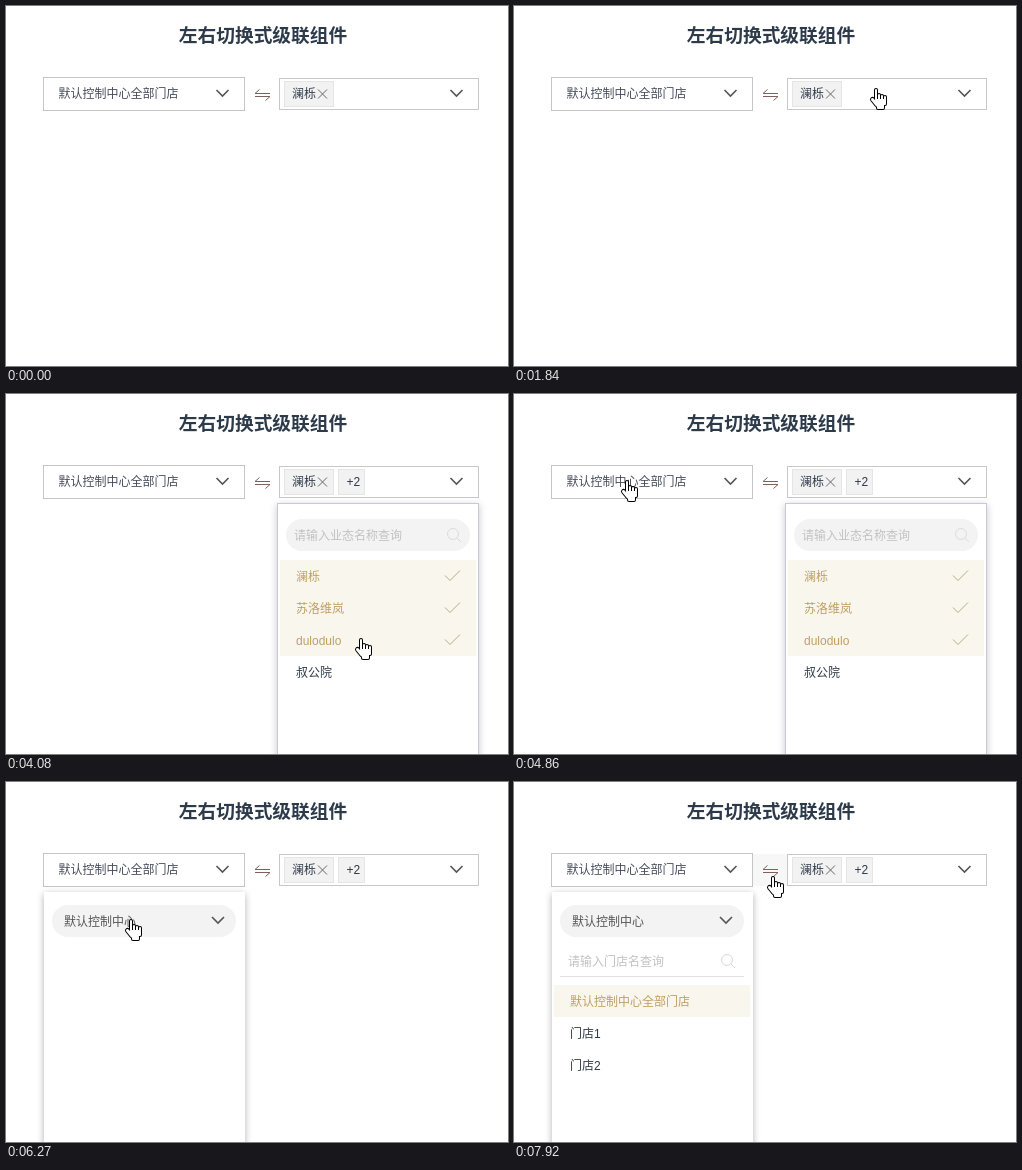
These frames come from a looping animation (502 px wide and 360 px high, 8 s). An HTML page with a canvas:

```html
<!DOCTYPE html>
<html lang="zh">
<head>
<meta charset="utf-8">
<style>
html, body { margin: 0; width: 100%; height: 100%; overflow: hidden; background: #fff; }
canvas { display: block; }
</style>
</head>
<body>
<canvas id="stage" width="502" height="360"></canvas>
<script>
const ctx = document.getElementById('stage').getContext('2d');
const LOOP = 8000, STEP = 76, ROW = 32;
const FONT = '"Liberation Sans", "Noto Sans CJK SC", "Noto Sans CJK", sans-serif';
const INK = '#2f3a4a', SOFT = '#555', HINT = '#c2c2c2', GOLD = '#bf9f62';
const CREAM = '#f9f6ee', HOVER = '#f5f7fa', PALE = '#f3f3f3';

const BRANDS = ['澜栎', '苏洛维岚', 'dulodulo', '叔公院'];
const CENTER = '默认控制中心';
const STORES = [CENTER + '全部门店', '门店1', '门店2'];

// Moments at which something is shown, clicked or closed
const SHOW_CURSOR = 70, OPEN_BRANDS = 2225, PICK = 3080, PICK_GAP = 550;
const OPEN_STORES = 5220, OPEN_CENTERS = 6270, CENTERS_READY = 6370, PICK_CENTER = 7620;

// The cursor glides to each stop in turn; sag bends the way there downwards
const glide = (start, end, x, y, sag = 0) => ({ start, end, x, y, sag });
const GLIDES = [
  glide(240, 410, 125, 45),
  glide(580, 1370, 347, 79, 30),
  glide(1440, 1840, 356, 82),
  glide(2605, 2830, 352, 212),
  glide(3155, 3380, 349, 244),
  glide(4157, 4620, 101, 72),
  glide(4790, 4860, 107, 86),
  glide(5720, 6120, 119, 137),
  glide(6590, 7390, 130, 180, 62),
  glide(PICK_CENTER, 7920, 253, 94)
];

const clamp = v => Math.max(0, Math.min(1, v));
const easeOut = (t, start, duration) => 1 - (1 - clamp((t - start) / duration)) ** 2;
const stepsIn = ms => Math.floor(ms / STEP) + 1;

function cursorAt(t) {
  if (t < SHOW_CURSOR) return null;
  let x = 303, y = 238;
  for (const g of GLIDES) {
    if (t < g.start) break;
    const p = clamp(stepsIn(t - g.start) / stepsIn(g.end - g.start));
    x += (g.x - x) * p;
    y += (g.y - y) * p + g.sag * Math.sin(Math.PI * p);
  }
  return { x: Math.round(x), y: Math.round(y) };
}

function fill(x, y, w, h, color, radius = 0) {
  ctx.fillStyle = color;
  ctx.beginPath();
  ctx.roundRect(x, y, w, h, radius);
  ctx.fill();
}

function frame(x, y, w, h, color) {
  ctx.strokeStyle = color;
  ctx.lineWidth = 1;
  ctx.strokeRect(x + 0.5, y + 0.5, w - 1, h - 1);
}

function line(color, width, ...points) {
  ctx.strokeStyle = color;
  ctx.lineWidth = width;
  ctx.beginPath();
  points.forEach(p => ctx.lineTo(...p));
  ctx.stroke();
}

function text(str, x, middle, color) {
  ctx.font = '12px ' + FONT;
  ctx.fillStyle = color;
  ctx.fillText(str, x, middle + 5);
}

const chevron = (x, y) => line(SOFT, 1.6, [x - 6, y - 3], [x, y + 3], [x + 6, y - 3]);
const check = (x, y) => line('#b9ac7c', 1, [x - 7.5, y], [x - 2.5, y + 5], [x + 7.5, y - 5]);

function cross(x, y) {
  for (const s of [-4.5, 4.5]) line('#666', 1, [x - 4.5, y - s], [x + 4.5, y + s]);
}

function swapArrows(x, y) {
  for (const s of [-1, 1]) {
    const shaft = y + s * 1.5;
    line('#80605a', 1, [x + s * 3, shaft + s * 4], [x + s * 7.5, shaft], [x - s * 7.5, shaft]);
  }
}

function lens(x, y, color) {
  ctx.strokeStyle = color;
  ctx.lineWidth = 1;
  ctx.beginPath();
  ctx.arc(x - 1, y - 1, 5.5, 0, Math.PI * 2);
  ctx.stroke();
  line(color, 1, [x + 3, y + 3], [x + 7, y + 7]);
}

function tag(label, x, w, textX) {
  fill(x, 75, w, 26, '#f2f2f2');
  frame(x, 75, w, 26, '#e5e5e5');
  text(label, textX, 87, INK);
}

// Stretches a dropdown down from its top edge while fading it in
function panel(x, y, w, amount, shadow, content) {
  if (amount <= 0) return;
  ctx.save();
  ctx.translate(0, y);
  ctx.scale(1, amount);
  ctx.translate(0, -y);
  ctx.globalAlpha = amount;
  ctx.shadowColor = shadow;
  ctx.shadowBlur = 7;
  ctx.shadowOffsetY = 2;
  fill(x, y, w, 380, '#fff');
  ctx.shadowColor = 'transparent';
  ctx.globalAlpha = 1;
  fill(x, y, w, 380, '#fff');
  ctx.globalAlpha = amount;
  content();
  ctx.restore();
}

function row(label, x, y, picked, hovered) {
  if (picked || hovered) fill(x, y, 196, ROW, picked ? CREAM : HOVER);
  text(label, x + 16, y + ROW / 2, picked ? GOLD : INK);
}

const isPicked = (i, t) => i === 0 || (i < 3 && t >= PICK + (i - 1) * PICK_GAP);

function drawHeader(t, onSwap) {
  ctx.font = 'bold 18.72px ' + FONT;
  ctx.fillStyle = '#2c3a4a';
  ctx.textAlign = 'center';
  ctx.fillText('左右切换式级联组件', 257, 36);
  ctx.textAlign = 'left';

  if (onSwap) fill(239, 72, 34, 32, '#f7f7f7');
  swapArrows(256.5, 89);

  frame(37, 71, 202, 34, '#c5c5c5');
  text(STORES[0], 52.5, 87, '#454c5a');
  chevron(216.5, 87);

  frame(273, 72, 200, 32, '#c8c8c8');
  tag(BRANDS[0], 278, 50, 286);
  cross(316.5, 88);
  const extra = BRANDS.filter((_, i) => isPicked(i, t)).length - 1;
  if (extra) tag('+' + extra, 332, 27, 340.5);
  chevron(450.5, 87);
}

function drawBrands(t, isOver) {
  frame(271, 109, 202, 380, '#c9c9d2');
  fill(280, 125, 184, ROW, PALE, 16);
  text('请输入业态名称查询', 288, 141, HINT);
  lens(448, 141, '#dcdcdc');
  BRANDS.forEach((name, i) => {
    const y = 166 + i * ROW, picked = isPicked(i, t);
    row(name, 274, y, picked, isOver(274, y, 196, ROW));
    if (picked) check(446.5, y + 15.5);
  });
}

function drawStores(t, isOver) {
  fill(46, 123, 184, ROW, PALE, 16);
  text(CENTER, 58, 139, SOFT);
  chevron(212, 138);
  if (t >= OPEN_CENTERS && t < PICK_CENTER) {
    if (t >= CENTERS_READY) row(CENTER, 40, 172, true);
    return;
  }
  text('请输入门店名查询', 54, 179, HINT);
  lens(214, 179, '#d8d8d8');
  fill(46, 194, 184, 1, '#e4e2e0');
  STORES.forEach((name, i) => {
    const y = 203 + i * ROW;
    row(name, 40, y, i === 0, isOver(40, y, 196, ROW));
  });
}

// Outline first, then the same parts one pixel smaller in white
function drawHand() {
  ctx.lineCap = 'round';
  for (const [color, inset] of [['#000', 0], ['#fff', 1]]) {
    const part = (x, y, w, h) => fill(x + inset, y + inset, w - 2 * inset, h - 2 * inset, color, 2 - inset);
    line(color, 5 - 2 * inset, [2.5, 11.5], [7, 17]);
    for (let i = 0; i < 4; i++) {
      const top = i ? 4 + i : 0;
      part(4 + 3 * i, top, 4, 13 - top);
    }
    part(4, 10, 13, 8);
    part(6, 14, 9, 8);
  }
}

function drawArrow() {
  const outline = new Path2D('M.5 .5V16.5L4.5 13L7 18.5L9 17.5L6.8 12H11.5Z');
  ctx.fillStyle = '#fff';
  ctx.strokeStyle = '#000';
  ctx.lineWidth = 1;
  ctx.fill(outline);
  ctx.stroke(outline);
}

function draw(t) {
  const pos = cursorAt(t);
  const isOver = (x, y, w, h) =>
    !!pos && pos.x + 6 >= x && pos.x + 6 < x + w && pos.y >= y && pos.y < y + h;
  const brandsOpen = easeOut(t, OPEN_BRANDS, 300) * (1 - easeOut(t, OPEN_STORES + 10, 300));
  const storesOpen = easeOut(t, OPEN_STORES, 200);
  const onSwap = isOver(239, 71, 34, 34);

  fill(0, 0, 502, 360, '#fff');
  drawHeader(t, onSwap);
  panel(271, 109, 202, brandsOpen, 'rgba(60,60,110,.3)', () => drawBrands(t, isOver));
  panel(38, 110, 201, storesOpen, 'rgba(0,0,0,.3)', () => drawStores(t, isOver));

  if (!pos) return;
  const onControl = isOver(37, 71, 436, 34) ||
    (brandsOpen > 0.5 && isOver(271, 109, 202, 251)) ||
    (storesOpen > 0.5 && isOver(38, 105, 202, 255));
  ctx.save();
  ctx.translate(pos.x, pos.y);
  onControl ? drawHand() : drawArrow();
  ctx.restore();
}

let origin;
function tick(now) {
  origin ??= now;
  draw((now - origin) % LOOP);
  requestAnimationFrame(tick);
}
draw(0);
requestAnimationFrame(tick);
</script>
</body>
</html>
```
